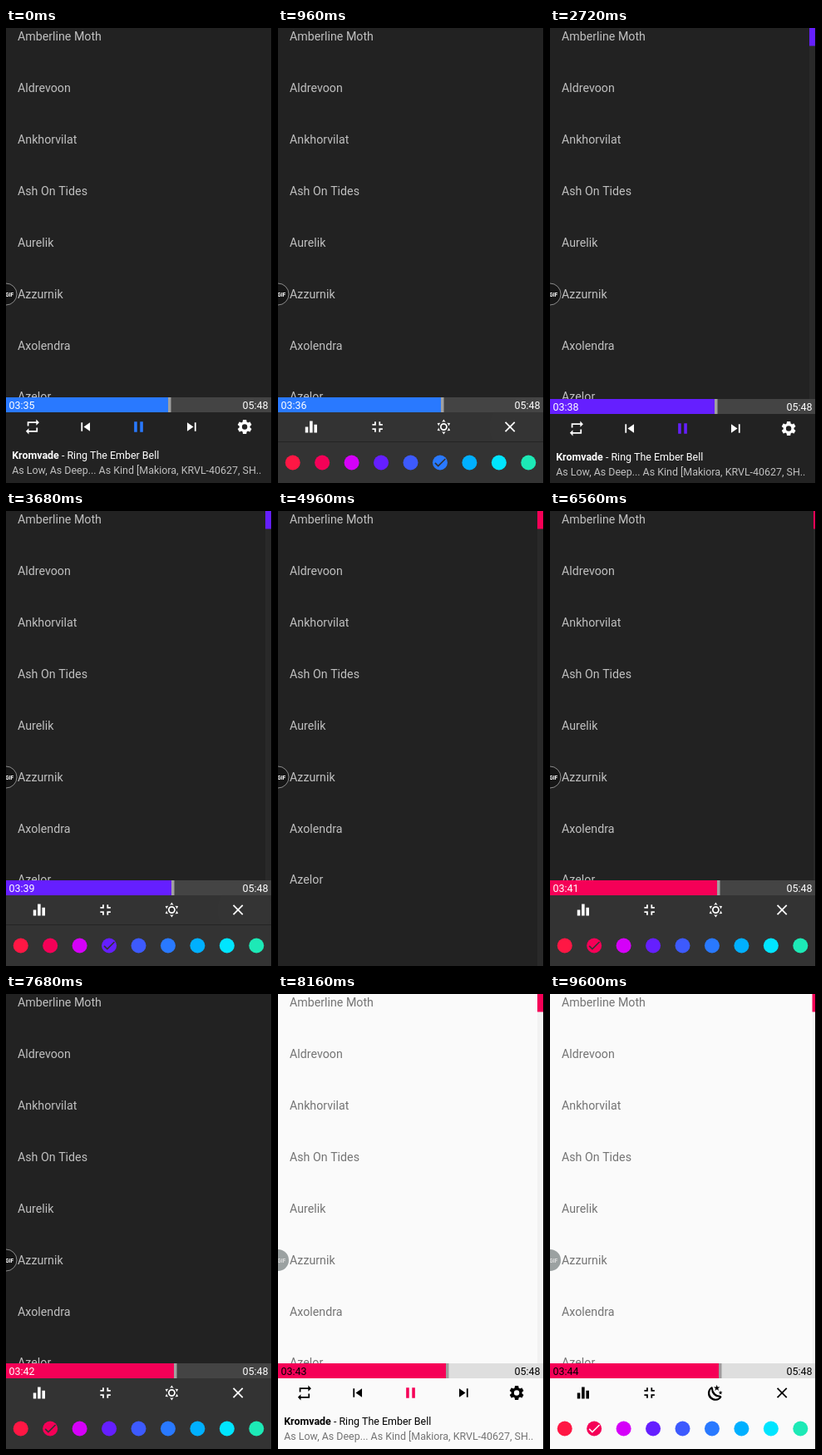
Write an HTML page with a canvas that moves like this. It is 320x547 px and loops after 9.76 s.

```html
<!DOCTYPE html>
<html lang="en">
<head>
<meta charset="utf-8">
<title>Music player accent picker</title>
<style>
  html, body { margin: 0; width: 100%; height: 100%; overflow: hidden; background: #222; }
  canvas { display: block; width: 320px; height: 547px; }
</style>
</head>
<body>
<canvas id="stage"></canvas>
<script>
const W = 319, H = 547, LOOP = 9760, STEP = 160;
const BAR_Y = 444, ROW_Y = 462, SWATCH_Y = 497, ICON_Y = 479.5;
const GEAR_X = 287;

const artists = ['Amberline Moth', 'Aldrevoon', 'Ankhorvilat', 'Ash On Tides',
  'Aurelik', 'Azzurnik', 'Axolendra', 'Azelor'];
const accents = ['#ff1744', '#f50057', '#d500f9', '#651fff', '#3d5afe',
  '#2979ff', '#00b0ff', '#00e5ff', '#1de9b6'];

const dark = { bg: '#222222', panel: '#333333', track: '#444444', list: '#c0c0c0',
  text: '#ffffff', handle: '#a0a0a0', badge: '#161616', badgeText: '#ffffff', overlay: '255,255,255' };
const light = { bg: '#fafafa', panel: '#fafafa', track: '#dedede', list: '#747474',
  text: '#000000', handle: '#9e9e9e', badge: '#9ba1a1', badgeText: '#dddddd', overlay: '0,0,0' };

// The screen is rebuilt whenever an accent or theme is chosen.
const never = -1e4;
const sessions = [
  { start: 0, slide: never, tap: 480, thumbHide: never, accent: 5, next: 3, pick: 1920, theme: dark },
  { start: 2240, slide: 2400, tap: 3220, thumbHide: 4200, accent: 3, next: 1, pick: 4640, theme: dark },
  { start: 4960, slide: 5050, tap: 5760, thumbHide: 6280, accent: 1, theme: dark },
  { start: 8000, slide: 7780, tap: 8480, thumbHide: 9380, accent: 1, theme: light }
];
const secondTicks = [800, 1440, 2400, 3360, 4320, 5440, 7040, 8000, 9120];

const icons = {
  repeat: 'M7 7h10v3l4-4-4-4v3H5v6h2zM17 17H7v-3l-4 4 4 4v-3h12v-6h-2z',
  previous: 'M6 6h2v12H6zM9.5 12l8.5 6V6z',
  pause: 'M6 19h4V5H6zM14 5v14h4V5z',
  next: 'M6 18l8.5-6L6 6zM16 6v12h2V6z',
  gear: 'M19.14 12.94c.04-.3.06-.61.06-.94s-.02-.64-.07-.94l2.03-1.58c.18-.14.23-.41.12-.61l-1.92-3.32c-.12-.22-.37-.29-.59-.22l-2.39.96c-.5-.38-1.03-.7-1.62-.94l-.36-2.54c-.04-.24-.24-.41-.48-.41h-3.84c-.24 0-.43.17-.47.41l-.36 2.54c-.59.24-1.13.57-1.62.94l-2.39-.96c-.22-.08-.47 0-.59.22L2.74 8.87c-.12.21-.08.47.12.61l2.03 1.58a8 8 0 0 0 0 1.88l-2.03 1.58c-.18.14-.23.41-.12.61l1.92 3.32c.12.22.37.29.59.22l2.39-.96c.5.38 1.03.7 1.62.94l.36 2.54c.05.24.24.41.48.41h3.84c.24 0 .44-.17.47-.41l.36-2.54c.59-.24 1.13-.56 1.62-.94l2.39.96c.22.08.47 0 .59-.22l1.92-3.32c.12-.22.07-.47-.12-.61zM12 15.6a3.6 3.6 0 1 1 0-7.2 3.6 3.6 0 0 1 0 7.2z',
  equalizer: 'M10 20h4V4h-4zM4 20h4v-8H4zM16 9v11h4V9z',
  shrink: 'M5 16h3v3h2v-5H5zM8 8H5v2h5V5H8zM14 19h2v-3h3v-2h-5zM16 8V5h-2v5h5V8z',
  close: 'M19 6.4L17.6 5 12 10.6 6.4 5 5 6.4 10.6 12 5 17.6 6.4 19 12 13.4 17.6 19 19 17.6 13.4 12z',
  ray: 'M12 2l2.4 3.4a7 7 0 0 0-4.8 0z',
  moon: 'M7 3.5A10 10 0 1 0 20 17.5L18.9 16A11 11 0 0 1 8 5zM6 6.7A11 11 0 0 0 17.3 18A8 8 0 0 1 6 6.7z',
  bigStar: 'M13.5 1l1 3 3.2.1-2.5 1.9.9 3.1-2.6-1.8-2.6 1.8.9-3.1-2.5-1.9 3.2-.1z',
  smallStar: 'M18.5 9l.7 2h2l-1.6 1.2.6 2-1.7-1.1-1.7 1.1.6-2L15.7 11h2.1z'
};
for (const name in icons) icons[name] = new Path2D(icons[name]);

const canvas = document.getElementById('stage');
const ctx = canvas.getContext('2d');
const density = window.devicePixelRatio || 1;
canvas.width = 320 * density;
canvas.height = H * density;

const clamp = x => Math.min(1, Math.max(0, x));
const easeInOut = x => (1 - Math.cos(Math.PI * clamp(x))) / 2;

function rect(color, x, y, w, h) {
  ctx.fillStyle = color;
  ctx.fillRect(x, y, w, h);
}

function disc(color, x, y, r) {
  ctx.fillStyle = color;
  ctx.beginPath();
  ctx.arc(x, y, r, 0, 2 * Math.PI);
  ctx.fill();
}

function label(text, x, y, color, size = 12.44, weight = 400, align = 'left') {
  ctx.font = `${weight} ${size}px Roboto, sans-serif`;
  ctx.textAlign = align;
  ctx.fillStyle = color;
  ctx.fillText(text, x, y);
  return ctx.measureText(text).width;
}

// Runs draw in a 24-unit icon box centred on x, y.
function inIconBox(x, y, draw, scale = 0.889) {
  ctx.save();
  ctx.translate(x, y);
  ctx.scale(scale, scale);
  ctx.translate(-12, -12);
  draw();
  ctx.restore();
}

function icon(name, x, color) {
  inIconBox(x, ICON_Y, () => {
    ctx.fillStyle = color;
    ctx.fill(icons[name], 'evenodd');
  });
}

function sun(x, color) {
  inIconBox(x, ICON_Y, () => {
    ctx.strokeStyle = ctx.fillStyle = color;
    ctx.lineWidth = 2;
    ctx.beginPath();
    ctx.arc(12, 12, 4, 0, 2 * Math.PI);
    ctx.stroke();
    for (let i = 0; i < 6; i++) {
      ctx.fill(icons.ray);
      ctx.translate(12, 12);
      ctx.rotate(Math.PI / 3);
      ctx.translate(-12, -12);
    }
  });
}

function drawList(theme) {
  rect(theme.bg, 0, 0, W, H);
  artists.forEach((name, i) => label(name, 14, 15.3 + i * 61.87, theme.list, 14.22));
}

function drawScrollbar(t, session) {
  const hidden = easeInOut((t - session.thumbHide) / 440);
  if (hidden === 1) return;
  const x = 312 + 7 * hidden;
  rect(`rgba(${session.theme.overlay},0.03)`, x, 0, 7, H);
  rect(accents[session.accent], x, 0, 7, 21.5);
}

function drawBadge(theme) {
  disc(theme.badge, 0, 320, 13);
  if (theme === dark) {
    ctx.strokeStyle = '#8c8c8c';
    ctx.lineWidth = 1;
    ctx.stroke();
  }
  label('GIF', -0.8, 322.5, theme.badgeText, 6.5, 700);
}

function drawProgress(t, theme, accent) {
  const seconds = 215 + secondTicks.filter(tick => t >= tick).length;
  const x = Math.round(W * seconds / 348) - 2;
  rect(theme.track, 0, BAR_Y, W, 18);
  rect(accent, 0, BAR_Y, x, 18);
  rect(theme.handle, x, BAR_Y, 3.5, 18);
  const clock = `0${Math.floor(seconds / 60)}:${String(seconds % 60).padStart(2, '0')}`;
  label(clock, 3.5, 458, theme.text);
  label('05:48', 315.5, 458, theme.text, 12.44, 400, 'right');
}

function drawPlayer(theme, accent) {
  rect(theme.bg, 0, ROW_Y, W, H - ROW_Y);
  ['repeat', 'previous', 'pause', 'next', 'gear'].forEach((name, i) =>
    icon(name, W / 5 * (i + 0.5), name === 'pause' ? accent : theme.text));
  const width = label('Kromvade', 7.2, 518, theme.text, 12.44, 700);
  label(' - Ring The Ember Bell', 7.2 + width, 518, theme.text);
  label('As Low, As Deep... As Kind [Makiora, KRVL-40627, SH..', 7.2, 536, theme.list);
}

function drawSettingsRow(theme, open) {
  ctx.save();
  ctx.beginPath();
  ctx.rect(0, ROW_Y, W, SWATCH_Y - ROW_Y);
  ctx.clip();
  ctx.beginPath();
  ctx.arc(GEAR_X, ICON_Y, 300 * open, 0, 2 * Math.PI);
  ctx.clip();
  rect(theme.panel, 0, ROW_Y, W, 35);
  const slot = i => W / 4 * (i + 0.5);
  icon('equalizer', slot(0), theme.text);
  icon('shrink', slot(1), theme.text);
  if (theme === dark) sun(slot(2), theme.text);
  else ['moon', 'bigStar', 'smallStar'].forEach(name => icon(name, slot(2), theme.text));
  icon('close', slot(3), theme.text);
  ctx.restore();
}

function drawSwatches(theme, open, selected, divider) {
  const top = SWATCH_Y + 50 * (1 - open);
  rect(theme.panel, 0, top, W, 50);
  if (divider) rect('#242424', 0, top, W, 1);
  accents.forEach((color, i) => {
    const x = W / 9 * (i + 0.5);
    disc(color, x, top + 25.5, 9);
    if (i !== selected) return;
    inIconBox(x, top + 25.5, () => {
      ctx.strokeStyle = theme.panel;
      ctx.lineWidth = 2.2;
      ctx.beginPath();
      ctx.moveTo(4, 12.5);
      ctx.lineTo(9, 17.5);
      ctx.lineTo(20.5, 6);
      ctx.stroke();
    }, 0.75);
  });
}

function drawRipple(age, theme) {
  if (age < 0 || age > 500) return;
  const alpha = 0.07 * (1 - age / 500);
  disc(`rgba(${theme.overlay},${alpha})`, GEAR_X, ICON_Y, 8 + 25 * clamp(age / 200));
}

function render(t) {
  const session = sessions.filter(s => t >= s.start).pop();
  const { theme } = session;
  const accent = accents[session.accent];
  const open = easeInOut((t - session.tap - 55) / 400);
  const drop = Math.round(103 * (1 - clamp((t - session.slide) / 370)) ** 2);
  const selected = t >= session.pick ? session.next : session.accent;

  ctx.setTransform(density, 0, 0, density, 0, 0);
  rect('#000', 0, 0, 320, H);
  drawList(theme);
  drawScrollbar(t, session);
  drawBadge(theme);

  ctx.save();
  ctx.translate(0, drop);
  drawPlayer(theme, accent);
  if (open > 0) drawSettingsRow(theme, open);
  drawRipple(t - session.tap, theme);
  if (open > 0) drawSwatches(theme, open, selected, session.accent !== 1);
  drawProgress(t, theme, accent);
  ctx.restore();

  rect('#000', W, 0, 1, H);
}

const began = performance.now();
function tick() {
  const t = (performance.now() - began) % LOOP;
  render(Math.floor(t / STEP) * STEP);
  requestAnimationFrame(tick);
}
tick();
</script>
</body>
</html>
```
